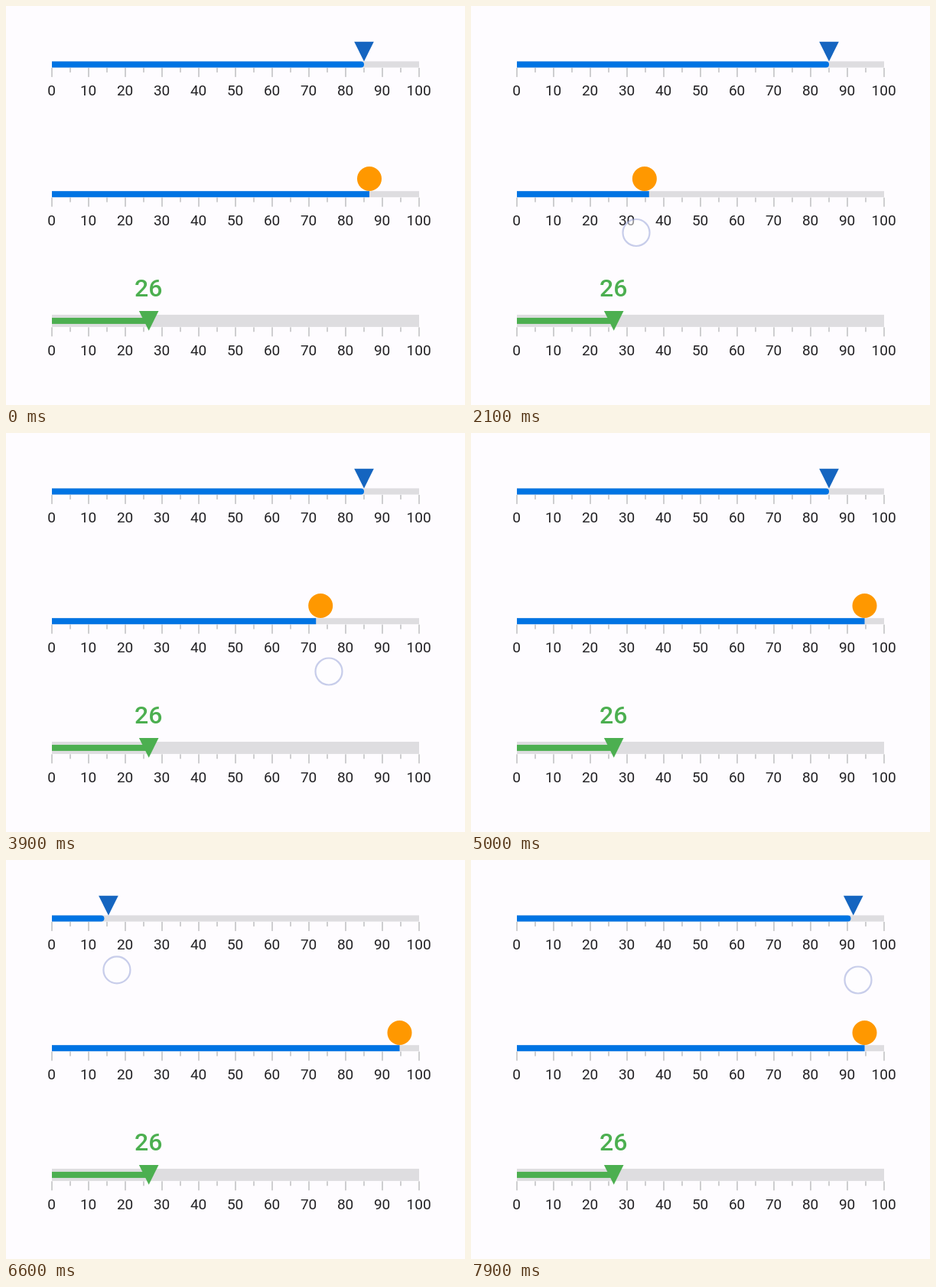
Write an HTML page with a canvas that moves like this. It is 600x522 px and loops after 8000 ms.

```html
<!DOCTYPE html>
<html lang="en">
<head>
<meta charset="utf-8">
<title>Linear gauges</title>
<style>
  html, body { margin: 0; width: 100%; height: 100%; overflow: hidden; background: #fefcff; }
  canvas { display: block; width: 600px; height: 522px; }
</style>
</head>
<body>
<canvas id="stage" width="600" height="522"></canvas>
<script>
const ctx = document.getElementById('stage').getContext('2d');
const LOOP = 8000, STEP = 100;
const LEFT = 60, WIDTH = 480;
const POINTER_LAG = 36, BAR_LAG = 55;
const TRACK = '#dedde0', BLUE = '#0074e3', GREEN = '#4caf50';

// Each drag swings between a few points; v is the speed in px per ms.
const middle = {
  rest: 475, release: 4600,
  points: [
    { t: 1400, x: 481, v: -0.42, y: 284 },
    { t: 2100, x: 216, v: -0.295, y: 296.5 },
    { t: 2740, x: 69, v: 0, y: 318.5 },
    { t: 3900, x: 422, v: 0.29, y: 312 },
    { t: 4450, x: 514.5, v: 0, y: 314 }
  ]
};
const upper = {
  rest: 468, release: LOOP,
  points: [
    { t: 5100, x: 475, v: 0, y: 130 },
    { t: 6000, x: 113, v: -0.285, y: 140.5 },
    { t: 6230, x: 79, v: 0, y: 142 },
    { t: 7200, x: 362, v: 0.3, y: 148 },
    { t: 7900, x: 506, v: 0.175, y: 157 }
  ]
};

// Finger position: cubic in x with the given speeds, smooth step in y.
function finger({ points }, t) {
  const i = points.findIndex(p => p.t > t);
  if (i === 0) return points[0];
  if (i < 0) return points[points.length - 1];
  const a = points[i - 1], b = points[i];
  const h = b.t - a.t, u = (t - a.t) / h, w = 1 - u;
  const s = u * u * (3 - 2 * u);
  return {
    x: a.x + (b.x - a.x) * s + h * u * w * (a.v * w - b.v * u),
    y: a.y + (b.y - a.y) * s
  };
}

// The gauge holds its resting value until the finger has pulled past it.
function valueX(drag, t) {
  const x = finger(drag, t).x;
  return t < drag.points[2].t ? Math.min(drag.rest, x) : x;
}

function rect(color, x, y, w, h) {
  ctx.fillStyle = color;
  ctx.fillRect(x, y, w, h);
}

function label(text, x, y, font, color) {
  ctx.font = font;
  ctx.fillStyle = color;
  ctx.textAlign = 'center';
  ctx.fillText(text, x, y);
}

function scale(bottom, thickness) {
  rect(TRACK, LEFT, bottom - thickness, WIDTH, thickness);
  for (let v = 0; v <= 100; v += 5) {
    const x = LEFT + v / 100 * WIDTH, major = v % 10 === 0;
    rect('#bfbec1', x - 0.75, bottom + 0.4, 1.5, major ? 12 : 6);
    if (major) label(String(v), x - 0.4, bottom + 36.7, '19px Roboto, sans-serif', '#222124');
  }
}

function triangle(color, x, y) {
  ctx.fillStyle = color;
  ctx.beginPath();
  ctx.moveTo(x - 12.8, y);
  ctx.lineTo(x + 12.8, y);
  ctx.lineTo(x, y + 25.8);
  ctx.fill();
}

function disc(color, x, y, r) {
  ctx.fillStyle = color;
  ctx.beginPath();
  ctx.arc(x, y, r, 0, Math.PI * 2);
  ctx.fill();
}

function touch(drag, t) {
  if (t < drag.points[0].t || t >= drag.release) return;
  const { x, y } = finger(drag, t);
  disc('rgba(255,255,255,0.5)', x, y, 17.5);
  ctx.strokeStyle = 'rgba(150,162,215,0.52)';
  ctx.lineWidth = 2.2;
  ctx.stroke();
}

function draw(t) {
  rect('#fefcff', 0, 0, 600, 522);

  scale(80.5, 8.1);
  ctx.fillStyle = BLUE;
  ctx.beginPath();
  ctx.roundRect(LEFT, 72.4, valueX(upper, t - BAR_LAG) - LEFT, 8.1, [0, 4, 4, 0]);
  ctx.fill();
  triangle('#1565c0', valueX(upper, t - POINTER_LAG), 46.7);

  scale(250.2, 8);
  rect(BLUE, LEFT, 242.2, valueX(middle, t - BAR_LAG) - LEFT, 8);
  disc('#ff9800', valueX(middle, t - POINTER_LAG), 226, 16);

  scale(419.9, 16);
  rect(GREEN, LEFT, 407.9, 126.7, 8);
  triangle(GREEN, 186.7, 399);
  label('26', 186.3, 379.9, '500 32px Roboto, sans-serif', GREEN);

  touch(middle, t);
  touch(upper, t);
}

function frame() {
  const t = performance.now() % LOOP;
  draw(Math.floor(t / STEP) * STEP);
  requestAnimationFrame(frame);
}
frame();
</script>
</body>
</html>
```
